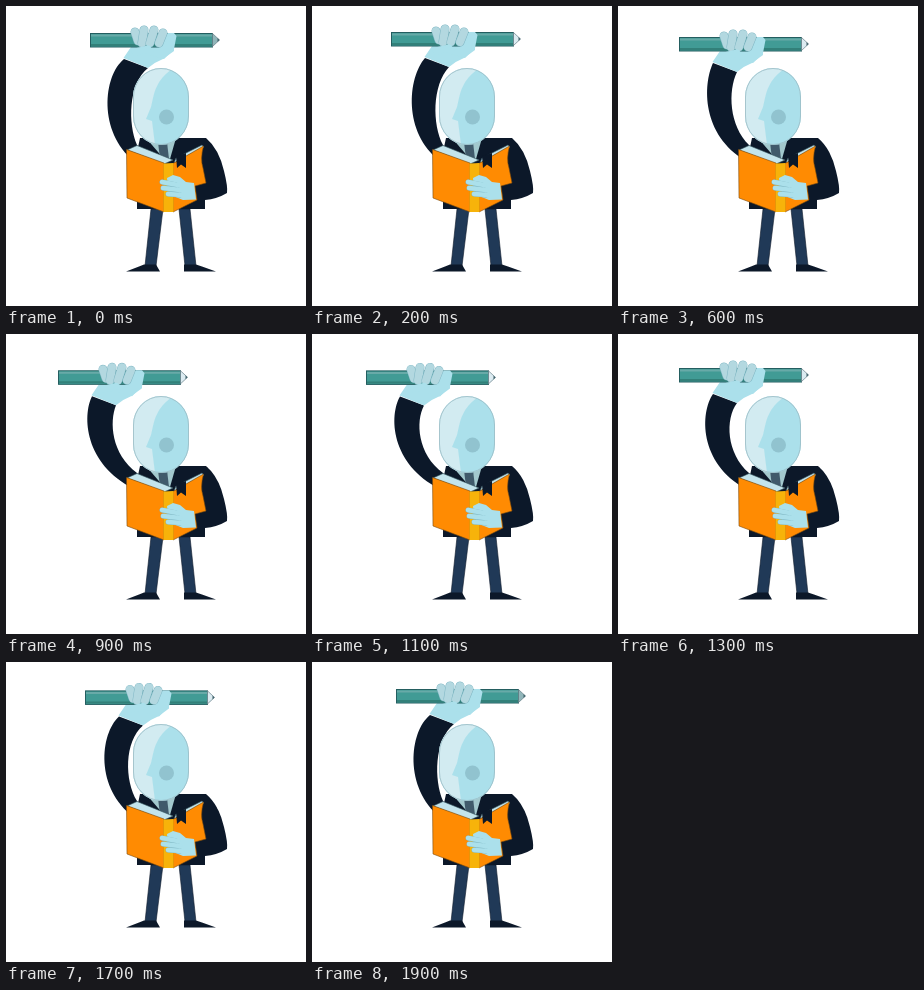
Write an HTML page that moves like this. It is 300 px wide and 300 px high and loops after 2000 ms.

```html
<!DOCTYPE html>
<html lang="en">
<head>
<meta charset="utf-8">
<title>Reader waving a pencil</title>
<style>
  html, body { margin: 0; width: 100%; height: 100%; overflow: hidden; background: #fff; }
  svg { display: block; width: 100vw; height: 100vh; }
  .navy { fill: #0c1829; }
  .trouser { fill: #203957; stroke: #0c1829; stroke-width: .6; }
  .skin { fill: #abe0eb; }
  .page { fill: #c3e4ec; stroke: #35545d; stroke-width: .6; }
  .cover { fill: #ff8b02; stroke: #7a4a10; stroke-width: .6; }
  .edge { stroke: #80b7c4; }
  .finger { stroke: #abe0eb; }
  .edge, .finger { fill: none; stroke-linecap: round; }
  #fingers .finger { stroke: #b3d8e0; }
</style>
</head>
<body>
<svg viewBox="0 0 300 300">
  <defs>
    <clipPath id="headClip"><rect x="127" y="62" width="56" height="77" rx="28" ry="29"/></clipPath>
  </defs>

  <g id="legs">
    <path class="trouser" d="M145 203H157L150 260H139Z"/>
    <path class="trouser" d="M173 203H184L190 260H179Z"/>
    <path class="navy" d="M138 258.500H150L154 265.500H120L133 260.500ZM178 258.500H190L196 260.500L210 265.500H178Z"/>
  </g>

  <path id="sleeve" class="navy"/>

  <g id="body">
    <path class="navy" d="M131 146L134 132H200Q213 143 218 165Q222 181 221 187Q211 193 199 194V203H131Z"/>
    <path d="M140 132H170L164 153H158Z" fill="#a2c8cd"/>
    <path d="M152 136H161L163 153H154Z" fill="#405a6b"/>
  </g>

  <g id="head">
    <g clip-path="url(#headClip)">
      <rect class="skin" x="127" y="62" width="56" height="77"/>
      <path d="M127 62H168Q151 72 147 92L145 101L140 113L146 115L149 139H127Z" fill="#d2ebf1"/>
    </g>
    <rect x="127.500" y="62.500" width="55" height="76" rx="27.500" ry="28.500" fill="none" stroke="#9bbcc5" stroke-width=".8"/>
  </g>
  <circle cx="160.500" cy="111" r="7.500" fill="#91c3cf"/>

  <g id="book">
    <path class="page" d="M121 144L131 139.500L167 154L158 158ZM168 157L170 152L196 139L198 141Z"/>
    <path class="cover" d="M120.500 143.500L158 157V206L121 192Z"/>
    <path class="cover" d="M167 157.500L197.500 140Q194 153 197 162L200 177L189 180L191 194L167 206Z"/>
    <path d="M157.500 157.500L167.500 157V206H157.500Z" fill="#f7b30a"/>
    <path class="navy" d="M170 150L180 147V162L175 158.500L171 162Z"/>
  </g>

  <g id="lowerHand">
    <path class="skin" d="M161 172L167 169L174 171L180 176L188 177L190 193.500L177 194L167 190L162 183Z"/>
    <path class="edge" stroke-width="5" d="M156 176L170 179M157 182L172 184M162 188L174 189"/>
    <path class="finger" stroke-width="4.400" d="M156 176L172 179M157 182L174 184M162 188L176 189"/>
  </g>

  <g id="grip">
    <path class="skin" d="M33.500 25L41 14H84V18L73 26Q65 29 58 35Z"/>
    <rect x=".5" y=".5" width="122" height="13.500" fill="#419b95" stroke="#245e60"/>
    <path d="M1 2.500H122" stroke="#68aaa8" stroke-width="2"/>
    <path d="M1 12H122" stroke="#328079" stroke-width="2"/>
    <path id="tip" d="M122.500 .5L129.500 7L122.500 13.500Z" stroke="#657f87" stroke-width=".7"/>
    <path d="M127.500 5L129.500 7L127.500 9Z" fill="#41626b"/>
    <path class="skin" d="M73 4L78 0H84L86.500 3L84 16L74 26L60 22L70 14Z"/>
    <g id="fingers"></g>
    <path class="finger" stroke-width="7" d="M45 19L58 16"/>
  </g>
</svg>
<script>
  const STEP = 100;
  // Pencil's left end on the way out; the way back mirrors it.
  const swing = [84, 82, 79, 75, 70, 65.5, 61, 57, 54, 52];
  const xs = [...swing, ...swing.slice().reverse()];
  // Pencil's top edge: a higher arc out, a lower one back.
  const ys = [27, 26.4, 26, 26.2, 27, 28.6, 31, 33, 35, 36.3,
              36.8, 36.4, 35.4, 34, 32.6, 31.2, 29.6, 28.4, 27.5, 27];

  const $ = id => document.getElementById(id);
  const sleeve = $('sleeve'), grip = $('grip'), tip = $('tip');

  const fingers = [[45, -1, 48, 8], [54, -3, 52, 10], [64, -3, 60, 10], [73, 0, 69, 10]];
  $('fingers').innerHTML = fingers.map(([x1, y1, x2, y2]) => {
    const d = `M${x1} ${y1}L${x2} ${y2}`;
    return `<path class="edge" stroke-width="9" d="${d}"/><path class="finger" stroke-width="8" d="${d}"/>`;
  }).join('');

  // u: 0 at the far left of the swing, 1 at rest; lag: the elbow trails the hand.
  function sleevePath(x, y, lag) {
    const u = (x - 52) / 32;
    return `M${x + 34} ${y + 26}` +
      `C${76 + 21 * u + 8 * u * (1 - u) + lag} ${82 - 12 * u} ` +
      `${78 + 14 * u + lag} ${130 - 4 * u} 128 155L145 155L131 139` +
      `C${105 + 17 * u + lag} ${120 - 2 * u} ` +
      `${103 + 19 * u + lag} ${88 - 10 * u} ${x + 58} ${y + 35}Z`;
  }

  function draw(now) {
    const i = Math.floor(now / STEP) % xs.length;
    const x = xs[i], y = ys[i];
    const lag = 1.5 * Math.sin(2 * Math.PI * i / (xs.length - 1));
    grip.setAttribute('transform', `translate(${x} ${y})`);
    sleeve.setAttribute('d', sleevePath(x, y, lag));
    tip.setAttribute('fill', x > 80 ? '#91b5b9' : '#dcebf1');
  }

  const start = performance.now();
  function tick() {
    draw(performance.now() - start);
    requestAnimationFrame(tick);
  }
  tick();
</script>
</body>
</html>
```
